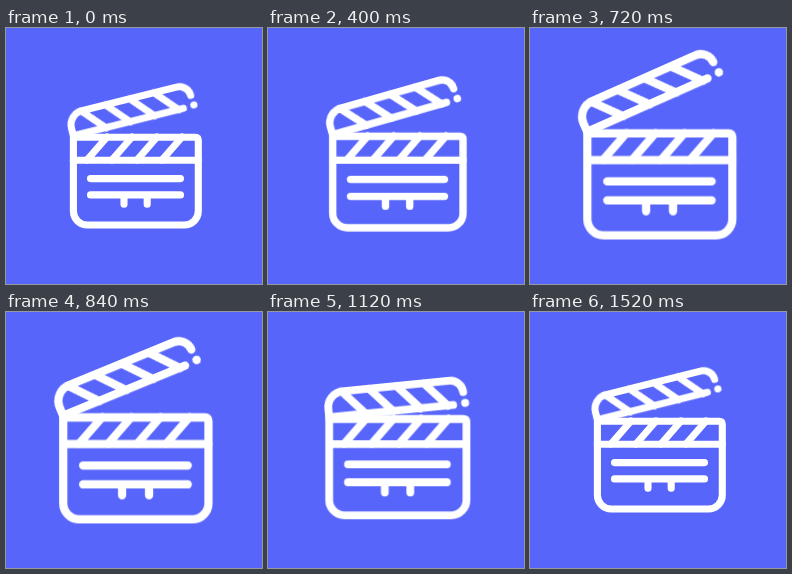
These frames come from a looping animation (256 by 256 pixels, 2.8 s). An HTML page:

```html
<!DOCTYPE html>
<html lang="en">
<head>
<meta charset="utf-8">
<title>Clapperboard</title>
<style>
  html, body {
    margin: 0;
    width: 100%;
    height: 100%;
    overflow: hidden;
    background: #5865fb;
  }
  svg {
    display: block;
    width: 100%;
    height: 100%;
    fill: none;
    stroke: #fff;
    stroke-width: 7.1;
    stroke-linecap: round;
    stroke-linejoin: round;
  }
  .board {
    transform-origin: 130px 133px;
    animation: swell 2800ms infinite;
  }
  .arm {
    transform-origin: 67.4px 108px;
    animation: clap 2800ms infinite;
  }
  @keyframes swell {
    0% { transform: scale(1); }
    7.5% { transform: scale(1); animation-timing-function: cubic-bezier(.37, 0, .63, 1); }
    27.143% { transform: scale(1.163); }
    32.857% { transform: scale(1.163); animation-timing-function: cubic-bezier(.3, .2, .6, 1); }
    54.286%, 100% { transform: scale(1); }
  }
  @keyframes clap {
    0% { transform: rotate(-14deg); }
    7.857% { transform: rotate(-14deg); animation-timing-function: cubic-bezier(.42, 0, .7, .97); }
    28.571% { transform: rotate(-24.7deg); animation-timing-function: cubic-bezier(.45, 0, .8, .7); }
    33.571% { transform: rotate(0deg); animation-timing-function: cubic-bezier(.3, .3, .6, 1); }
    54.286%, 100% { transform: rotate(-14deg); }
  }
</style>
</head>
<body>
<svg viewBox="0 0 256 256">
  <g class="board">
    <path d="M67.4 109.3H189.3q3 0 3 3V183a14 14 0 0 1-14 14H81.4a14 14 0 0 1-14-14Z"/>
    <path d="M67.4 132.2H192.3"/>
    <path d="M81 132l20-23M106 132l20-23M131 132l20-23M156 132l20-23"/>
    <path d="M84.5 150.6H174.5M84.5 166.9H174.5M118 166.9v9.4M141.2 166.9v9.4"/>
    <g class="arm">
      <path d="M180.8 107.8H67.4V100a14.5 14.5 0 0 1 14.5-14.5H179.5a11.5 11.5 0 0 1 11.5 11.5"/>
      <path d="M81 85.5l20 22.5M106 85.5l20 22.5M131 85.5l20 22.5M156 85.5l20 22.5"/>
      <circle cx="191.8" cy="107" r="3.6" fill="#fff" stroke="none"/>
    </g>
  </g>
</svg>
</body>
</html>
```
